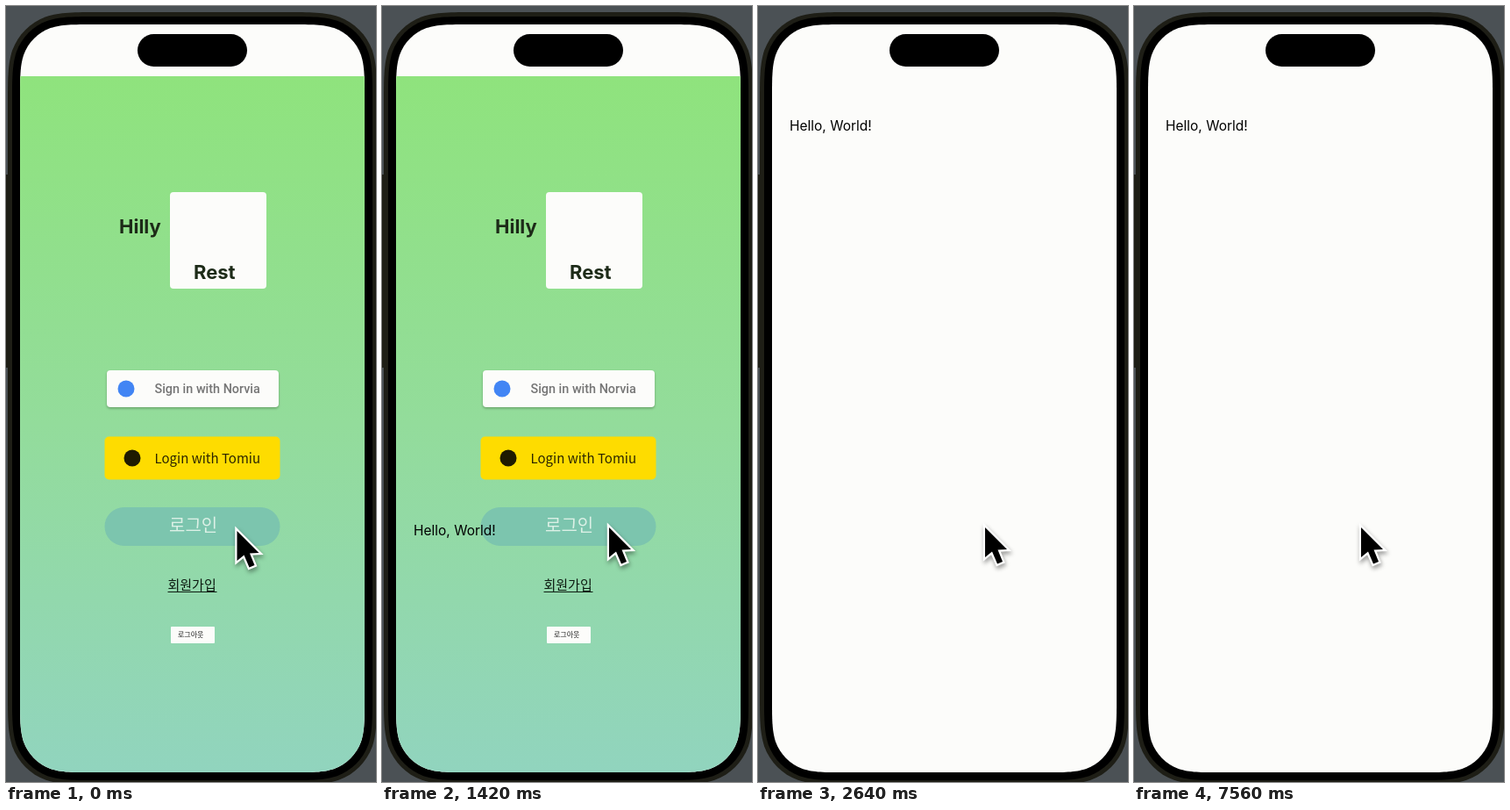
Animation, 422 px wide and 884 px high, one loop 7.88 s. Source, as an HTML page with a canvas:

```html
<!DOCTYPE html>
<html lang="ko">
<head>
<meta charset="utf-8">
<style>
html, body { margin: 0; width: 100%; height: 100%; overflow: hidden; background: #4b5155; }
canvas { display: block; }
</style>
</head>
<body>
<canvas id="stage" width="422" height="884"></canvas>
<script>
const LOOP = 7880;
const FPS = 60;
// Steps are shown in groups of three, held for 100, 20 and 20 ms.
const GROUP = 140, LONG = 100, SHORT = 20;
const MOVE_FROM = 16, MOVE_TO = 20;
const SLIDE_FROM = 25, SLIDE_TO = 55;
const SLIDE_DIST = 852, SPRING = 18.6;
const CJK = '"Noto Sans CJK KR", "Noto Sans CJK", "Noto Sans", sans-serif';
const INTER = 'Inter, sans-serif';
const PAPER = '#fcfcfa';

const ctx = document.getElementById('stage').getContext('2d');

function box(x, y, w, h, r, fill) {
  ctx.fillStyle = fill;
  ctx.beginPath();
  ctx.roundRect(x, y, w, h, r);
  ctx.fill();
}

// Rectangle with continuous-curvature corners.
function smoothRect(x, y, w, h, r) {
  const corner = (cx, cy, ux, uy, vx, vy) => {
    const at = (a, b) => [cx + r * (a * ux + b * vx), cy + r * (a * uy + b * vy)];
    ctx.lineTo(...at(1.5287, 0));
    ctx.bezierCurveTo(...at(1.0885, 0), ...at(0.8684, 0), ...at(0.6315, 0.0749));
    ctx.bezierCurveTo(...at(0.3728, 0.1691), ...at(0.1691, 0.3728), ...at(0.0749, 0.6315));
    ctx.bezierCurveTo(...at(0, 0.8684), ...at(0, 1.0885), ...at(0, 1.5287));
  };
  ctx.beginPath();
  corner(x, y, 0, 1, 1, 0);
  corner(x + w, y, -1, 0, 0, 1);
  corner(x + w, y + h, 0, -1, -1, 0);
  corner(x, y + h, 1, 0, 0, -1);
  ctx.closePath();
}

// Screen outline grown by a margin.
function screenPath(grow) {
  smoothRect(16 - grow, 21 - grow, 393 + 2 * grow, 852 + 2 * grow, 55 + grow);
}

function dot(x, y, r, fill) {
  ctx.fillStyle = fill;
  ctx.beginPath();
  ctx.arc(x, y, r, 0, Math.PI * 2);
  ctx.fill();
}

function label(text, x, y, font, fill) {
  ctx.font = font;
  ctx.fillStyle = fill;
  ctx.fillText(text, x, y);
}

function withShadow(color, blur, dx, dy, draw) {
  ctx.save();
  ctx.shadowColor = color;
  ctx.shadowBlur = blur;
  ctx.shadowOffsetX = dx;
  ctx.shadowOffsetY = dy;
  draw();
  ctx.restore();
}

const sky = ctx.createLinearGradient(0, 80, 0, 873);
sky.addColorStop(0, '#8fe37d');
sky.addColorStop(0.5, '#93dc9b');
sky.addColorStop(1, '#91d4be');

function drawPhone() {
  ctx.fillStyle = '#4b5155';
  ctx.fillRect(0, 0, 422, 884);
  ctx.fillStyle = '#1e1e16';
  ctx.fillRect(0, 192, 3, 220);
  screenPath(14);
  ctx.fill();
  ctx.fillStyle = '#000';
  screenPath(9);
  ctx.fill();
}

function drawBrand() {
  box(187, 212, 110, 110, 4, PAPER);
  label('Hilly', 129, 259, '700 22px ' + INTER, '#1d2b18');
  label('Rest', 214, 311, '700 22px ' + INTER, '#1d2b18');
}

function drawLogin() {
  ctx.fillStyle = sky;
  ctx.fillRect(16, 80, 393, 794);
  drawBrand();

  withShadow('rgba(40,70,30,.4)', 3, 0, 1.5, () => box(115, 415, 196, 42, 4, PAPER));
  dot(137, 436, 9.5, '#4285f4');
  label('Sign in with Norvia', 169.5, 441, '500 14.4px Roboto, sans-serif', '#757575');

  box(112.5, 490.5, 200, 49, 5, '#fedc00');
  dot(144, 515, 9.5, '#1f1b00');
  label('Login with Tomiu', 169.5, 521, '400 15px ' + CJK, '#2b2500');

  box(112.5, 571, 200, 44, 22, '#7cc5ae');
  label('로그인', 186, 599, '400 20px ' + CJK, '#dcf0e6');

  label('회원가입', 184.5, 665, '400 15px ' + CJK, '#0c1a10');
  ctx.fillRect(184.5, 667, 56, 1);

  box(188, 707, 50, 19, 1, PAPER);
  label('로그아웃', 196, 719, '500 8px ' + CJK, '#222');
}

function drawCursor(x, y) {
  ctx.save();
  ctx.translate(x, y);
  ctx.beginPath();
  [[2, 5], [2, 39], [10, 32.5], [16, 46.5], [22, 44], [16.5, 30.5], [27, 30]]
    .forEach(p => ctx.lineTo(...p));
  ctx.closePath();
  ctx.lineWidth = 4.5;
  ctx.lineJoin = 'miter';
  ctx.strokeStyle = '#fff';
  withShadow('rgba(0,0,0,.4)', 5, 1, 3, () => ctx.stroke());
  ctx.fillStyle = '#000';
  ctx.fill();
  ctx.restore();
}

function stepAt(t) {
  const u = t + LONG + SHORT;
  const rest = u % GROUP;
  const part = rest < LONG ? 0 : rest < LONG + SHORT ? 1 : 2;
  return 3 * (Math.floor(u / GROUP) - 1) + part;
}

// Critically damped spring: distance still to travel.
function slideOffset(step) {
  if (step >= SLIDE_TO) return 0;
  const k = SPRING * Math.max(0, step - SLIDE_FROM) / FPS;
  return SLIDE_DIST * (1 + k) * Math.exp(-k);
}

function render(step) {
  drawPhone();
  ctx.save();
  screenPath(0);
  ctx.clip();
  ctx.fillStyle = PAPER;
  ctx.fillRect(16, 20, 393, 854);
  if (step < SLIDE_TO) drawLogin();
  label('Hello, World!', 36, 142 + slideOffset(step), '400 15.5px ' + INTER, '#000');
  ctx.restore();
  box(150, 32, 125, 37, 18.5, '#000');

  const p = Math.min(1, Math.max(0, (step - MOVE_FROM) / (MOVE_TO - MOVE_FROM)));
  drawCursor(261.5 - 4.5 * p, 593 - 4 * p);
}

const start = performance.now();
function tick() {
  render(stepAt((performance.now() - start) % LOOP));
  requestAnimationFrame(tick);
}
tick();
</script>
</body>
</html>
```
